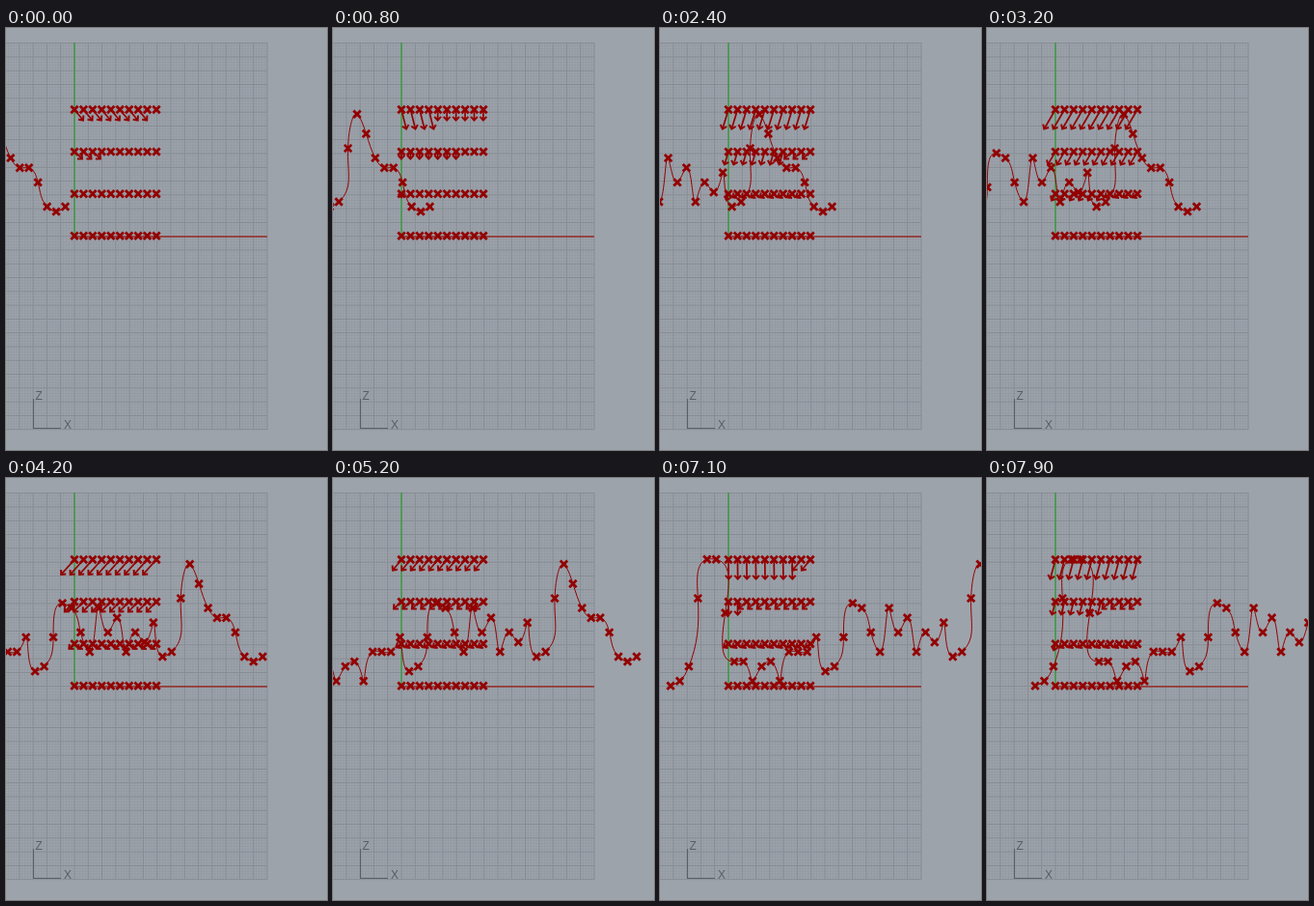
Write an HTML page with a canvas that moves like this. It is 333 by 437 pixels and loops after 8000 ms.

```html
<!DOCTYPE html>
<html>
<head>
<meta charset="utf-8">
<style>
html, body { margin: 0; width: 100%; height: 100%; overflow: hidden; background: #9da3ab; }
canvas { display: block; }
</style>
</head>
<body>
<canvas width="333" height="437"></canvas>
<script>
const ctx = document.querySelector('canvas').getContext('2d');
const RED = '#930000', LEFT = 71, BASE = 215.3, STEP = 9.443, ROW_GAP = 43.6, UNIT = 200 / 70;
const SPEED = 0.04875, TIP = 61.5;

// Levels of the travelling curve, from its leading tip backwards
const levels = [6, 5, 6, 11, 14, 14, 16, 21, 25, 18, 7, 6, 13, 9, 11, 7, 14, 11, 16, 7, 11, 16,
  17, 10, 4, 3, 10, 7, 7, 7, 1, 5, 4, 1, 5, 5, 15, 26, 26, 18, 4, 1, 0];
const points = levels.map((n, i) => [-i * STEP, BASE - n * 5.04]);
const chords = points.slice(1).map((p, i) => Math.hypot(p[0] - points[i][0], p[1] - points[i][1]));
const crests = [levels.indexOf(25), levels.indexOf(26)].map(i => -i * STEP);

// Tangents of a natural cubic spline with chord-length parameters
function tangents(axis) {
  const n = points.length, m = Array(n).fill(0);
  const d = chords.map((h, i) => (points[i + 1][axis] - points[i][axis]) / h);
  for (let pass = 0; pass < 80; pass++) {
    m[0] = (3 * d[0] - m[1]) / 2;
    for (let i = 1; i < n - 1; i++) {
      const a = chords[i - 1], b = chords[i];
      m[i] = (3 * (b * d[i - 1] + a * d[i]) - b * m[i - 1] - a * m[i + 1]) / (2 * (a + b));
    }
    m[n - 1] = (3 * d[n - 2] - m[n - 2]) / 2;
  }
  return m;
}
const tx = tangents(0), ty = tangents(1);

const clamp = (v, lo, hi) => Math.min(hi, Math.max(lo, v));
const mix = (a, b, f) => a + (b - a) * f;

// A steady drift follows the tip; each crest pulls harder until it has passed.
// Lower rows (row 0 is the top) react later and more weakly.
function flow(x, row, tip) {
  const reach = 81 - row * 52, depth = row / 3;
  if (x > tip + reach) return [0, 0];
  const calm = 1 - depth ** 2;
  let v = [clamp((100 - tip) / 4, -9, 9) * calm, 11 * (1 - depth)];
  for (const offset of crests) {
    const crest = tip + offset;
    if (x > crest + reach) continue;
    const pull = clamp((230 - crest) / 80, 0, 1), size = 20 * (1 - depth);
    v = [mix(v[0], size * (60 - crest) / 140, pull), mix(v[1], size, pull)];
  }
  return v;
}

function line(color, width, ...pts) {
  ctx.strokeStyle = color;
  ctx.lineWidth = width;
  ctx.beginPath();
  pts.forEach(p => ctx.lineTo(...p));
  ctx.stroke();
}

function cross(x, y) {
  line(RED, 2.8, [x - 3.7, y - 3.7], [x + 3.7, y + 3.7]);
  line(RED, 2.8, [x - 3.7, y + 3.7], [x + 3.7, y - 3.7]);
}

function arrow(x, y, [dx, dy]) {
  if (Math.hypot(dx, dy) < 1.5) return;
  const angle = Math.atan2(dy, dx), tip = [x + dx, y + dy];
  const barb = s => [tip[0] - 5 * Math.cos(angle + s), tip[1] - 5 * Math.sin(angle + s)];
  line(RED, 1.7, [x, y], tip);
  line(RED, 2, barb(0.75), tip, barb(-0.75));
}

function drawGrid() {
  ctx.fillStyle = '#9da3ab';
  ctx.fillRect(0, 0, 333, 437);
  for (const major of [false, true]) {
    const color = major ? '#858b93' : '#959ba3';
    for (let i = -70; i <= 70; i++) {
      if ((i % 5 === 0) !== major) continue;
      const x = LEFT + i * UNIT, y = 215.7 + i * UNIT;
      line(color, 1, [x, 15], [x, 416]);
      line(color, 1, [0, y], [271, y]);
    }
  }
  line('#2f9a35', 1.3, [LEFT, 15], [LEFT, 215]);
  line('#962a26', 1.3, [LEFT, 216], [271, 216]);
  line('#5a5f66', 1.1, [28.5, 384], [28.5, 414.5], [57, 414.5]);
  ctx.fillStyle = '#5a5f66';
  ctx.font = '12px "Liberation Sans", Arial, sans-serif';
  ctx.fillText('Z', 30.5, 385);
  ctx.fillText('X', 60, 415);
}

function drawCurve(tip) {
  ctx.save();
  ctx.translate(tip, 0);
  ctx.beginPath();
  ctx.moveTo(...points[0]);
  chords.forEach((h, i) => {
    const [x0, y0] = points[i], [x1, y1] = points[i + 1], s = h / 3;
    ctx.bezierCurveTo(x0 + tx[i] * s, y0 + ty[i] * s,
      x1 - tx[i + 1] * s, y1 - ty[i + 1] * s, x1, y1);
  });
  ctx.strokeStyle = RED;
  ctx.lineWidth = 1;
  ctx.stroke();
  points.forEach(p => cross(...p));
  ctx.restore();
}

function draw(now) {
  const tip = TIP + Math.floor(now % 8000 / 100) * 100 * SPEED;
  drawGrid();
  drawCurve(tip);
  for (let row = 0; row < 4; row++) {
    for (let k = 0; k < 10; k++) {
      const x = LEFT + k * STEP, y = BASE - (3 - row) * ROW_GAP;
      arrow(x, y, flow(x, row, tip));
      cross(x, y);
    }
  }
}

let start;
function frame(now) {
  start ??= now;
  draw(now - start);
  requestAnimationFrame(frame);
}
draw(0);
requestAnimationFrame(frame);
</script>
</body>
</html>
```
